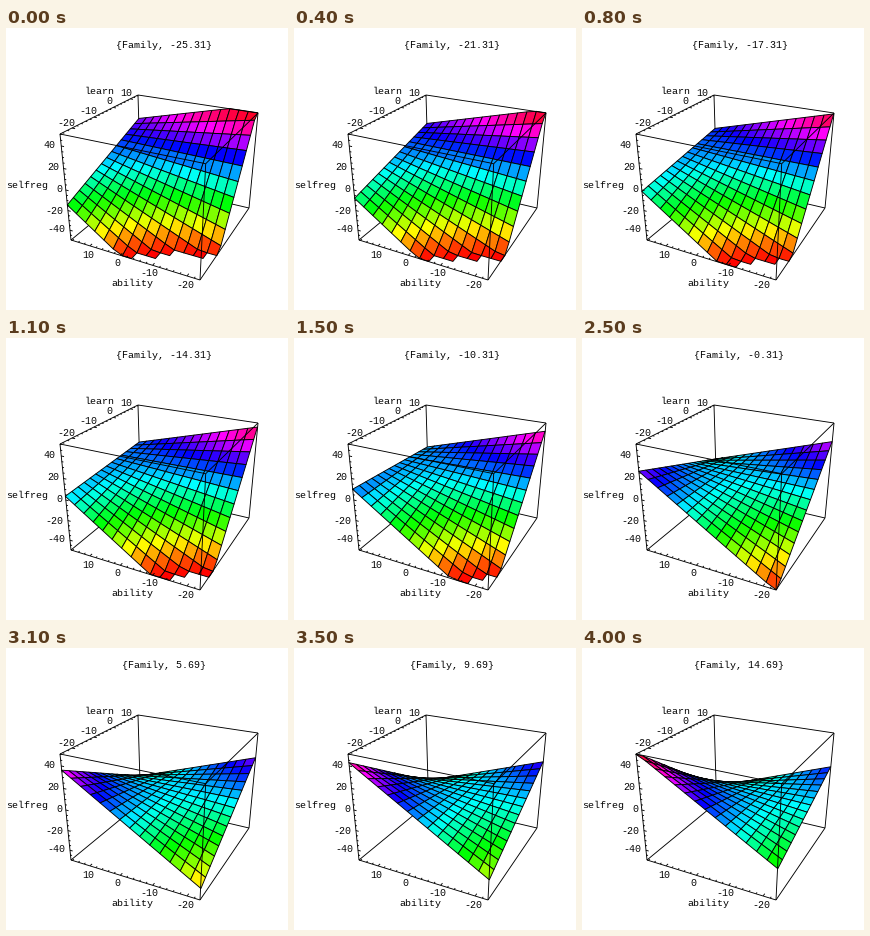
A matplotlib script for the animation above (4.1 s loop, 282x282 px).

```python
import colorsys
import itertools

import matplotlib.pyplot as plt
import numpy as np
from matplotlib.animation import FuncAnimation
from matplotlib.collections import LineCollection, PolyCollection

SIZE, DPI = 282, 64
PT = 72 / DPI          # points per pixel
FRAMES, STEP_MS = 41, 100
CELLS = 14
LINE = 0.9 * PT

plt.rcParams.update({
    "font.family": "Liberation Mono",
    "text.hinting": "native",
    "text.hinting_factor": 1,
})

# Box corners on screen, keyed by (across, depth, height) in 0..1.
CORNERS = {
    (0, 0, 0): (65, 212), (1, 0, 0): (194, 252),
    (1, 1, 0): (243, 180), (0, 1, 0): (134.6, 154.7),
    (0, 0, 1): (54, 106), (1, 0, 1): (199.7, 135.7),
    (1, 1, 1): (252, 85), (0, 1, 1): (132, 67),
}


def fit_camera():
    """Least-squares perspective matrix through the box corners."""
    rows, rhs = [], []
    for (a, b, c), (x, y) in CORNERS.items():
        p = [a, b, c, 1]
        rows.append(p + [0] * 4 + [-x * a, -x * b, -x * c])
        rows.append([0] * 4 + p + [-y * a, -y * b, -y * c])
        rhs += [x, y]
    sol = np.linalg.lstsq(np.array(rows, float), np.array(rhs, float), rcond=None)[0]
    return np.append(sol, 1).reshape(3, 4)


CAMERA = fit_camera()


def project(points):
    pts = np.asarray(points, float)
    h = np.concatenate([pts, np.ones(pts.shape[:-1] + (1,))], axis=-1) @ CAMERA.T
    return h[..., :2] / h[..., 2:]


# Surface grid: first index is depth (learn), second is across (ability).
U = np.linspace(0, 1, CELLS + 1)
ACROSS, DEPTH = np.meshgrid(U, U)


def heights(k):
    """Bilinear sheet whose corner heights drift linearly with the step."""
    left = 0.355 + 0.0164 * k
    front = -0.525 + 0.0205 * k
    back = 0.75 - 0.0137 * k
    right = 1.07 - 0.0101 * k
    near = left + (front - left) * ACROSS
    far = back + (right - back) * ACROSS
    return near + (far - near) * DEPTH


def surface(k):
    raw = heights(k)
    z = np.clip(raw, 0, 1)
    screen = project(np.stack([ACROSS, DEPTH, z], axis=-1))
    quads, colors = [], []
    for j in reversed(range(CELLS)):          # far to near
        for i in range(CELLS):
            ring = ([j, j, j + 1, j + 1], [i, i + 1, i + 1, i])
            if raw[ring].max() <= 0 or raw[ring].min() >= 1:
                continue
            quads.append(screen[ring])
            colors.append(colorsys.hsv_to_rgb(z[ring].mean(), 1, 1))
    return quads, colors


def box_edges():
    hidden, shown = [], []
    for p, q in itertools.combinations(CORNERS, 2):
        if sum(abs(s - t) for s, t in zip(p, q)) == 1:
            (hidden if (0, 1, 0) in (p, q) else shown).append([CORNERS[p], CORNERS[q]])
    return hidden, shown


def tick_lines(first, minor, per_major, place, inward):
    """Ticks along an edge; `first` is the position of a major tick."""
    lines = []
    n0, n1 = int(np.ceil(-first / minor)), int(np.floor((1 - first) / minor))
    for n in range(n0, n1 + 1):
        start = np.array(place(first + n * minor), float)
        length = 0.024 if n % per_major == 0 else 0.014
        lines.append(project([start, start + length * np.array(inward)]))
    return lines


fig = plt.figure(figsize=(SIZE / DPI, SIZE / DPI), dpi=DPI, facecolor="white")
ax = fig.add_axes([0, 0, 1, 1])
ax.set_xlim(0, SIZE)
ax.set_ylim(SIZE, 0)
ax.axis("off")


def label(x, y, text):
    return ax.text(x, y + 3.5, text, fontsize=10 * PT, ha="center",
                   va="baseline", color="black", zorder=5)


def add_lines(lines, z):
    ax.add_collection(LineCollection(lines, colors="black", linewidths=LINE,
                                     zorder=z), autolim=False)


back_edges, front_edges = box_edges()
add_lines(back_edges, 1)
add_lines(front_edges, 3)
add_lines(tick_lines(0.165, 0.0496, 5, lambda t: (t, 0, 0), (0, 1, 0)), 3)
add_lines(tick_lines(0.127, 0.0498, 5, lambda t: (0, t, 1), (1, 0, 0)), 3)
add_lines(tick_lines(0.1, 0.05, 4, lambda t: (0, 0, t), (1, 0, 0)), 3)

LABELS = [
    (94, 62, "learn"), (60, 94, "-20"), (82, 83, "-10"), (103, 73, "0"), (120, 64, "10"),
    (21, 156, "selfreg"), (44, 116, "40"), (47, 139, "20"), (53, 160, "0"),
    (48, 182, "-20"), (50, 200, "-40"),
    (126, 254, "ability"), (82, 226, "10"), (111, 235, "0"), (143, 245, "-10"), (179, 256, "-20"),
]
for item in LABELS:
    label(*item)

title = label(157.5, 17, "")
mesh = PolyCollection([], edgecolors="black", linewidths=LINE, zorder=2)
ax.add_collection(mesh, autolim=False)


def draw(k):
    quads, colors = surface(k)
    mesh.set_verts(quads)
    mesh.set_facecolor(colors)
    title.set_text(f"{{Family, {k - 25.31:.2f}}}")
    return mesh, title


anim = FuncAnimation(fig, draw, frames=FRAMES, interval=STEP_MS, repeat=True, repeat_delay=0)
plt.show()
```
